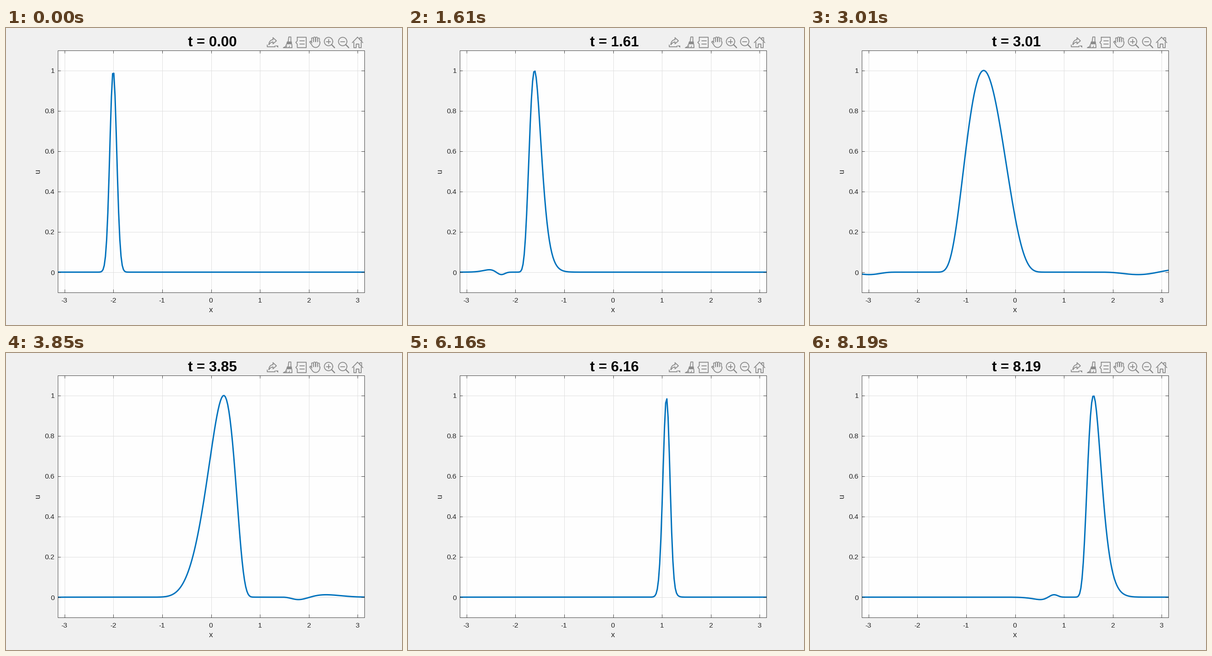
Write a matplotlib script that moves like this. It is 864 px wide and 648 px high and loops after 8.26 s.

```python
import numpy as np
import matplotlib.pyplot as plt
from matplotlib.animation import FuncAnimation
from matplotlib.patches import Rectangle

W, H, DPI = 864, 648, 72
FRAMES, STEP_MS = 118, 70
L, R = 0.13 * W, 0.905 * W                  # plot box in pixels, y down
T, B = 0.075 * H, 0.89 * H
INK, ICON, BLUE = "#262626", "#8a8a8a", "#0072bd"

plt.rcParams["font.family"] = "Liberation Sans"
fig = plt.figure(figsize=(W / DPI, H / DPI), dpi=DPI, facecolor="#f0f0f0")
ax = fig.add_axes([0, 0, 1, 1])
ax.set_xlim(0, W)
ax.set_ylim(H, 0)
ax.axis("off")


def px(x):
    return L + (x + np.pi) * (R - L) / (2 * np.pi)


def py(u):
    return B - (u + 0.1) * (B - T) / 1.2


def crisp(v):
    return np.floor(v) + 0.5


def seg(x, y, color=INK, lw=0.85, z=5):
    ax.plot(x, y, color=color, lw=lw, zorder=z, solid_capstyle="butt")


def label(x, y, s, size=15.4, ha="center", va="baseline", **kw):
    return ax.text(x, y, s, size=size, ha=ha, va=va, color=INK, **kw)


# ---- plot box, grid, ticks ----
l, r, t, b = map(crisp, (L, R, T, B))
ax.add_patch(Rectangle((l, t), r - l, b - t, fc="#fefefe", ec="none", zorder=0))
ax.add_patch(Rectangle((l, t), r - l, b - t, fill=False, ec=INK, lw=0.85,
                       zorder=5))
for k in range(-3, 4):
    x = crisp(px(k))
    seg([x, x], [t, b], "#dfdfdf", 1, 1)
    seg([x, x], [t, t + 6.5])
    seg([x, x], [b, b - 6.5])
    label(px(k), 598.8, str(k))
for k in range(6):
    y = crisp(py(k / 5))
    seg([l, r], [y, y], "#dfdfdf", 1, 1)
    seg([l, l + 6.5], [y, y])
    seg([r, r - 6.5], [y, y])
    label(106, py(k / 5) + 5.8, f"{k / 5:g}", ha="right")
label((L + R) / 2, 620, "x", 17)
label(77.3, (T + B) / 2, "u", 17, ha="right", va="center", rotation=90)


# ---- toolbar icons, each drawn around its own centre ----
def icon(cx, cy=31.5):
    def stroke(x, y, lw=1.8, fill=False):
        x, y = np.broadcast_arrays(x, y)
        if fill:
            ax.fill(cx + x, cy + y, fc=ICON, ec="none", zorder=6)
        else:
            ax.plot(cx + x, cy + y, color=ICON, lw=lw, zorder=6,
                    solid_capstyle="round", solid_joinstyle="round")
    return stroke


def arc(rx, ry, start=0, stop=2 * np.pi):
    a = np.linspace(start, stop, 40)
    return rx * np.cos(a), ry * np.sin(a)


def export():
    draw = icon(580)
    s = np.linspace(0, 1, 12)
    draw(2.5 - 9 * np.sin(s * np.pi / 2), 5 - 11 * np.cos(s * np.pi / 2))
    draw(2.5 - 9 * s, -1 + 6 * s ** 2)
    draw([2.5, 2.5, 10, 2.5, 2.5], [-6, -10.5, -3.5, 3, -1])
    draw([-9.7, -9.7, 7, 7], [5.5, 9.8, 9.8, 7])
    draw([7.5, 14, 14], [6.5, 11.5, 7], fill=True)


def brush():
    draw = icon(618)
    draw([-2.4, -1, 3.6, 3.6], [-2, -12, -12, -2])
    draw([-5, 5.5, 6, -6.5], [-2, -2, 4, 4], fill=True)
    draw([-6, -8, -13, 6, 5.6], [4, 9, 11.5, 11.5, 4])
    for x in (-6, 0):
        draw([x - 1, x + 1], [11, 7.5], 1.4)


def data_tip():
    draw = icon(645)
    draw([-9.5, 10, 10, -9.5, -9.5, -12.7, -9.5, -9.5],
         [-11.3, -11.3, 11.3, 11.3, 3.6, 0, -3.6, -11.3])
    for y in (-3.5, 3.5):
        draw([-4.5, 5.5], y)


def hand():
    draw = icon(675)
    for k in range(4):
        x, y = arc(2, 2, np.pi, 2 * np.pi)
        draw(4.5 * k - 6.5 + x, y - 10 + 0.9 * (k - 1.4) ** 2, 1.6)
        for side in (-2, 2):
            draw(4.5 * k - 6.5 + side, [-10 + 0.9 * (k - 1.4) ** 2, -2], 1.6)
    x, y = arc(9.5, 11, 0, 0.85 * np.pi)
    draw(np.append(x, [-13, -11, -8]) + 0.5, np.append(y, [-1, -3, 1]))
    draw(10, [-2, 0])


def zoom(cx, plus):
    draw = icon(cx, 29.5)
    draw(*arc(9.2, 9.2))
    draw([6.8, 13.2], [6.8, 13.5], 2.4)
    draw([-4.5, 4.5], 0)
    if plus:
        draw(0, [-4.5, 4.5])


def home():
    draw = icon(767)
    for side in (-1, 1):
        draw(side * np.array([0, 11.5]), [-11.5, 0.5])
        draw(side * np.array([8.3, 8.3, 3, 3, 0]), [-1, 11.8, 11.8, 3.5, 3.5])
    draw([5.3, 5.3, 8.6, 8.6], [-7, -11, -11, -3], 1.6)


export()
brush()
data_tip()
hand()
zoom(703.7, True)
zoom(734.6, False)
home()


# ---- transport along speed c(x) = 0.2 + sin^2(x + 2) ----
ROOT6, RATE = np.sqrt(6), np.sqrt(0.24)
STRETCH = 257 / 256      # the solver's grid makes waves slightly fast
LAG = 0.0014             # start-up error of the two-step scheme

grid = np.linspace(-np.pi, np.pi, 257)


def warp(y, k):
    turns = np.pi * np.round(y / np.pi)
    return turns + np.arctan(k * np.tan(y - turns))


def foot(x, time):
    """Where the characteristic through x started, relative to x = -2."""
    return warp(warp(x + 2, ROOT6) - RATE * STRETCH * time, 1 / ROOT6)


def pulse(s):
    return np.exp(-100 * s ** 2)


def ripple(s):
    return pulse(s) - pulse(s - LAG)


def wave(time):
    back = foot(grid, -time)
    # the backward ripple changes sign as it wraps around
    return (pulse(foot(grid, time) - LAG)
            + ripple(back) - ripple(back - 2 * np.pi))


line, = ax.plot([], [], color=BLUE, lw=3, zorder=3, solid_joinstyle="round")
line.set_clip_path(Rectangle((l, t), r - l, b - t, transform=ax.transData))
title = ax.text(397, 39.8, "", size=31.3, weight="bold", color="black",
                ha="left", va="baseline")


def draw_frame(i):
    time = i * STEP_MS / 1000
    line.set_data(px(grid), py(wave(time)))
    title.set_text(f"t = {time:.2f}")
    return line, title


anim = FuncAnimation(fig, draw_frame, frames=FRAMES, interval=STEP_MS,
                     repeat=True, repeat_delay=0)
plt.show()
```
